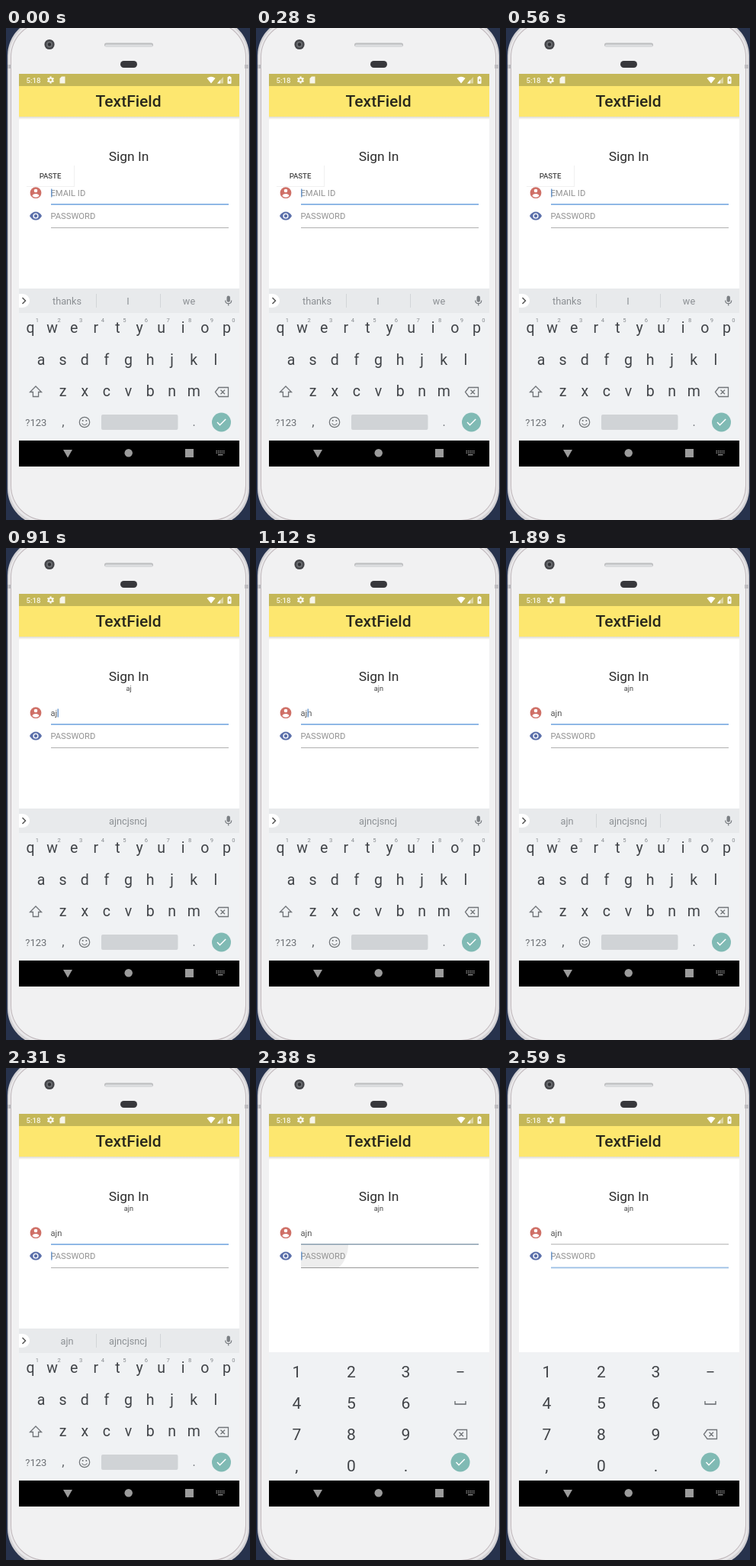
Write an HTML page with a canvas that moves like this. It is 320 by 644 pixels and loops after 2.66 s.

```html
<!DOCTYPE html>
<html lang="en">
<head>
<meta charset="utf-8">
<title>Sign in form</title>
<style>
html, body { margin: 0; width: 100%; height: 100%; overflow: hidden; background: #27324c; }
canvas { display: block; width: 320px; height: 644px; }
</style>
</head>
<body>
<canvas id="stage" width="320" height="644"></canvas>
<script>
const ctx = document.getElementById('stage').getContext('2d');
const LOOP = 2660, STEP = 70;
const INK = '#414448', GREY = '#85898d', BLUE = '#76a8e0', LINE = '#b0b0b0';

function rect(x, y, w, h, color) {
  ctx.fillStyle = color;
  ctx.fillRect(x, y, w, h);
}

function round(x, y, w, h, r, color) {
  ctx.fillStyle = color;
  ctx.beginPath();
  ctx.roundRect(x, y, w, h, r);
  ctx.fill();
}

function disc(x, y, r, color) {
  ctx.fillStyle = color;
  ctx.beginPath();
  ctx.arc(x, y, r, 0, Math.PI * 2);
  ctx.fill();
}

function text(str, x, y, size, color = INK, align = 'center', weight = 400) {
  ctx.font = `${weight} ${size}px Roboto, sans-serif`;
  ctx.textAlign = align;
  ctx.fillStyle = color;
  ctx.fillText(str, x, y);
}

// Draws a path around its own origin; a line width makes it an outline.
function icon(path, x, y, color, lineWidth = 0) {
  ctx.save();
  ctx.translate(x, y);
  const shape = new Path2D(path);
  if (lineWidth) {
    ctx.strokeStyle = color;
    ctx.lineWidth = lineWidth;
    ctx.stroke(shape);
  } else {
    ctx.fillStyle = color;
    ctx.fill(shape);
  }
  ctx.restore();
}

const clamp = v => Math.max(0, Math.min(1, v));
const ramp = (t, from, to) => clamp((t - from) / (to - from));

function drawPhone() {
  rect(0, 0, 320, 644, '#27324c');
  round(2, -12, 317, 663, 48, '#d3d1d4');
  round(4, -10, 313, 658, 47, '#e9e8ea');
  round(6, -8, 309, 653, 46, '#bfb6ba');
  round(7, -7, 307, 651, 45, '#f1f1f2');
  for (const x of [2, 313]) rect(x, 48, 5, 5, '#bfbdc1');

  disc(57, 21.5, 6.6, '#45464a');
  disc(57, 21.5, 4, '#6d6f73');
  disc(57, 21.5, 2.2, '#303135');
  round(129, 19.5, 64, 5, 2.5, '#bcbdbf');
  round(130, 21.5, 62, 3, 1.5, '#dcdddf');
  round(150, 43, 22, 9, 4.5, '#38383c');
}

function drawStatusBar() {
  rect(17, 60, 289, 16, '#c4b758');
  text('5:18', 26.5, 72, 9.7, '#f8f6ea', 'left', 500);
  ctx.save();
  ctx.translate(58.5, 68);
  for (let i = 0; i < 3; i++) {
    rect(-1.2, -4.6, 2.4, 9.2, '#f8f6ea');
    ctx.rotate(Math.PI / 3);
  }
  ctx.restore();
  disc(58.5, 68, 3.3, '#f8f6ea');
  disc(58.5, 68, 1.5, '#c4b758');
  icon('M-1-4.5H3.5V4.5H-3.5V-2Z', 74, 68, '#f8f6ea');
  icon('M0 4.5L-5.5-2.3Q0-6.3 5.5-2.3Z', 269, 68, '#fff');
  icon('M4 4.5H-4L4-4Z', 281, 68, '#ddd5a0');
  icon('M-4 4.5H0V0Z', 281, 68, '#fff');
  round(290.5, 64, 5, 9, 0.7, '#fff');
  rect(291.8, 63, 2.4, 1, '#fff');
  icon('M.5-2.5L-1 1H0V3L1.5-.5H.5Z', 293, 68, '#b7aa4f');
}

function drawAppBar() {
  rect(17, 76, 289, 40, '#fde76f');
  const shade = ctx.createLinearGradient(0, 116, 0, 120);
  shade.addColorStop(0, '#dddbd0');
  shade.addColorStop(1, '#fff');
  rect(17, 116, 289, 4, shade);
  text('TextField', 160.5, 103, 21, '#29271c', 'center', 500);
}

function drawPaste() {
  rect(27, 180, 63, 28, '#f0f0f0');
  rect(27, 179, 62, 28, '#fff');
  text('PASTE', 58, 197, 9.6, '#444', 'center', 500);
}

function drawCursor(x, y, alpha) {
  ctx.globalAlpha = alpha;
  rect(x, y - 5.5, 1.5, 11, '#6495cf');
  ctx.globalAlpha = 1;
}

function drawRipple(t) {
  if (t < 2340 || t >= 2590) return;
  ctx.save();
  ctx.beginPath();
  ctx.rect(59, 231, 233, 30);
  ctx.clip();
  ctx.globalAlpha = 1 - ramp(t, 2400, 2590);
  disc(80, 232, 41 + (t - 2380) * 0.45, '#ededed');
  ctx.restore();
}

function drawForm(t) {
  const typed = 'ajn'.slice(0, t < 700 ? 0 : t < 840 ? 1 : t < 980 ? 2 : 3);
  text('Sign In', 161, 174, 17.4, '#2c2c2c');
  if (typed) text(typed, 161, 187, 9.2, '#444');
  else drawPaste();

  disc(39, 215.7, 7.4, '#cf7067');
  disc(39, 213, 2.3, '#fff');
  icon('M-4.6 4.1Q-3.8 1.2 0 1.2T4.6 4.1Q2.8 6 0 6T-4.6 4.1Z', 39, 215.7, '#fff');
  icon('M-8 0Q-5-5.5 0-5.5T8 0Q5 5.5 0 5.5T-8 0Z', 39, 246, '#5b6faa');
  disc(39, 246, 3.6, '#fff');
  disc(39, 246, 2.2, '#5b6faa');

  drawRipple(t);
  text(typed || 'EMAIL ID', 58.5, 220, 11.2, typed ? '#555' : '#929292', 'left');
  text('PASSWORD', 58.5, 250, 11.2, '#929292', 'left');

  if (t < 2100) {
    const x = [59, 65, 67.5, 67.5][typed.length];
    drawCursor(x, 216, t < 1470 ? 0.9 : 0.9 - 0.9 * ramp(t, 1470, 1750));
  }
  if (t >= 2240) drawCursor(59, 246, 0.85);

  if (t < 2380) rect(59, 230, 233, 1.6, BLUE);
  else if (t < 2450) rect(59, 230, 233, 1.4, '#8298aa');
  else rect(59, 230.2, 233, 1, LINE);

  rect(59, 261, 233, 1, t < 2380 ? LINE : '#999');
  if (t >= 2450) {
    ctx.globalAlpha = 0.4 + 0.6 * ramp(t, 2450, 2590);
    rect(59, 260.5, 233, 1.8, '#9cbfe5');
    ctx.globalAlpha = 1;
  }
}

function drawBackspace(x, y) {
  icon('M-8.5 0L-4-6H8.5V6H-4Z M-1.5-2.8L4 2.8M4-2.8L-1.5 2.8', x, y, '#707478', 1.3);
}

function drawDone(x) {
  disc(x, 516, 12.5, '#80bab4');
  icon('M-5.5 0L-2 3.7L5.7-4', x, 516, '#fff', 1.5);
}

function drawSuggestions(t) {
  rect(17, 341, 289, 32, '#e8eaec');
  round(17, 348, 14, 18, [0, 9, 9, 0], '#fff');
  icon('M-2-4L2 0L-2 4', 23.5, 357, '#555', 1.5);

  const single = t >= 840 && t < 1260;
  const words = t < 840 ? ['thanks', 'I', 'we']
    : single ? ['', 'ajncjsncj', ''] : ['ajn', 'ajncjsncj', ''];
  words.forEach((word, i) => text(word, 80 + i * 80, 362, 12.7, '#8b8f93'));
  if (!single) for (const x of [118, 202]) rect(x, 348, 1, 18, '#d2d5d8');

  round(289.5, 350.5, 4.4, 8.2, 2.2, '#7b7f83');
  icon('M-4-1Q-4 3.2 0 3.2T4-1M0 3.2V6', 291.7, 357.5, '#7b7f83', 1.2);
}

function drawLetters(t) {
  drawSuggestions(t);
  const row = (keys, x, y) =>
    [...keys].forEach((key, i) => text(key, x + i * 28.6, y, 19.5));
  row('qwertyuiop', 32, 399);
  row('asdfghjkl', 46, 440.5);
  row('zxcvbnm', 74.7, 482);
  [...'1234567890'].forEach((n, i) => text(n, 41 + i * 28.6, 385, 7.6, GREY));

  icon('M0-7L7.5 .5H3.6V6.5H-3.6V.5H-7.5Z', 39, 476, '#707478', 1.3);
  drawBackspace(283, 476.5);
  text('?123', 39.3, 521, 13, '#6b6f73');
  text(',', 75, 521, 17, '#606468');
  icon('M6.7 0A6.7 6.7 0 1 1-6.7 0A6.7 6.7 0 1 1 6.7 0M-3.5 1.5Q0 6 3.5 1.5',
    103, 516, '#707478', 1.2);
  for (const x of [100.7, 105.3]) disc(x, 514, 1, '#707478');
  round(125, 506, 100.5, 20, 2, '#d0d3d6');
  text('.', 246.5, 521, 16, '#707478');
  drawDone(282.5);
}

function drawNumbers() {
  ['123', '456', '789', ',0.'].forEach((keys, r) =>
    [...keys].forEach((key, c) => text(key, 53.3 + c * 71.6, 405.3 + r * 40.8, 21)));
  rect(263.5, 397, 9, 1.5, INK);
  icon('M-7-2V2H7V-2', 268, 438, '#63676b', 1.3);
  drawBackspace(268, 479.5);
  drawDone(268);
}

function drawNavBar() {
  rect(17, 540, 289, 34, '#000');
  icon('M-6-4.5H6L0 6Z', 81, 556.5, '#9b9b9b');
  disc(160.7, 556.3, 5.2, '#9b9b9b');
  rect(235, 551, 11, 11, '#9b9b9b');
  for (let r = 0; r < 2; r++)
    for (let c = 0; c < 5; c++) rect(275.5 + c * 2.4, 553 + r * 2.5, 1.4, 1.4, '#999');
  rect(278, 558, 6.5, 1.3, '#999');
}

function draw(now) {
  const t = Math.floor((now % LOOP) / STEP) * STEP;
  drawPhone();
  rect(17, 60, 289, 514, '#fff');
  drawStatusBar();
  drawAppBar();
  drawForm(t);
  rect(17, 372, 289, 168, '#f0f2f4');
  if (t < 2380) drawLetters(t);
  else drawNumbers();
  drawNavBar();
}

const start = performance.now();
function tick() {
  draw(performance.now() - start);
  requestAnimationFrame(tick);
}
tick();
</script>
</body>
</html>
```
